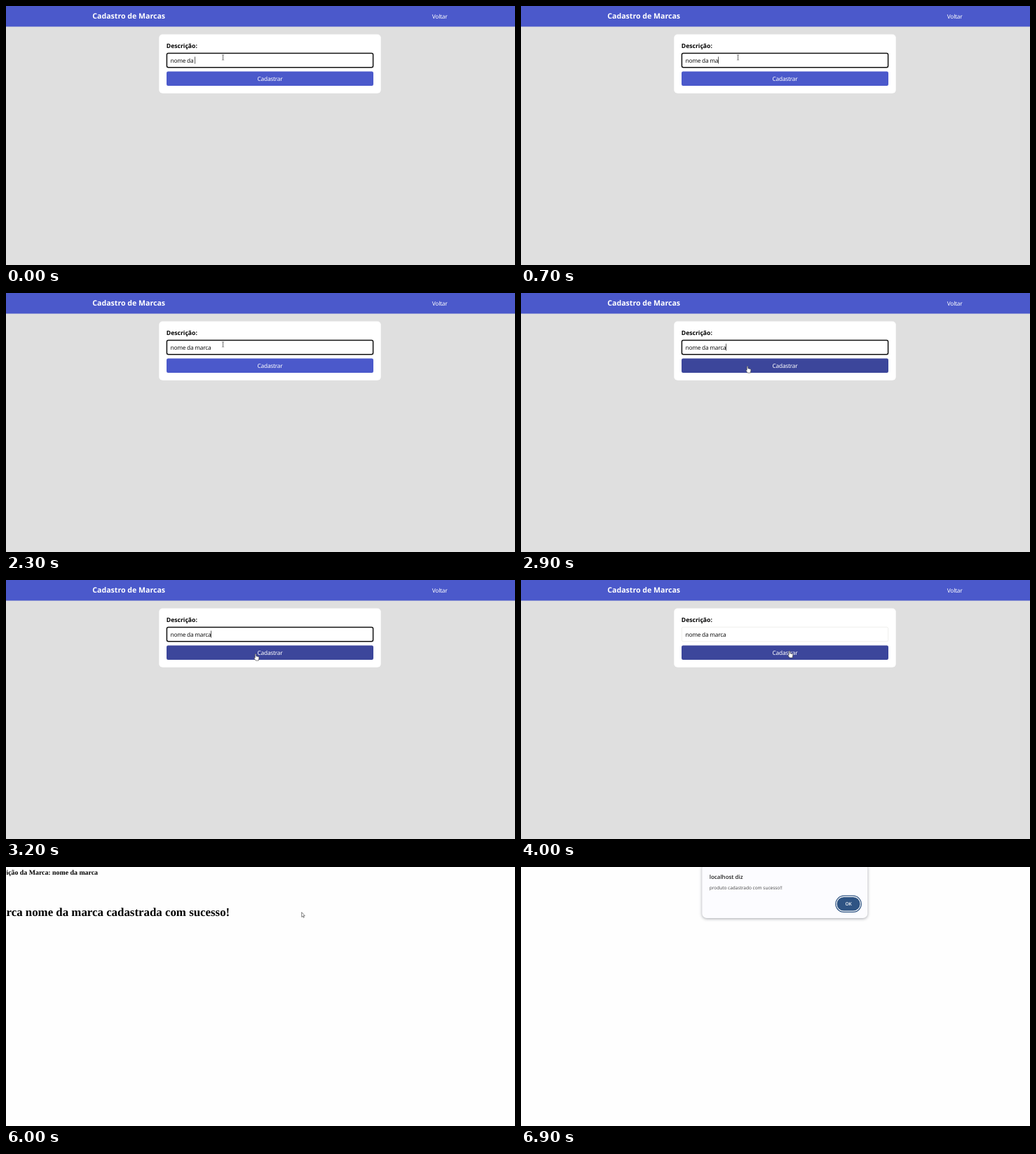
Animation, 726 px wide and 370 px high, one loop 8 s. Source, as an HTML page with a canvas:

```html
<!DOCTYPE html>
<html lang="pt">
<head>
<meta charset="utf-8">
<title>Cadastro de Marcas</title>
<style>
html, body { margin: 0; width: 100%; height: 100%; overflow: hidden; background: #fefefe; }
canvas { display: block; }
</style>
</head>
<body>
<canvas id="stage" width="726" height="370"></canvas>
<script>
const ctx = document.getElementById('stage').getContext('2d');
const LOOP = 8000;
const UI = '"Noto Sans", "Open Sans", sans-serif';
const SERIF = '"Liberation Serif", "Times New Roman", serif';
const DIALOG = '"Open Sans", "Noto Sans", sans-serif';
const BLUE = '#4b59cb', HOVER = '#3c469b';

// [time, characters shown]
const typing = [[0, 8], [500, 9], [700, 10], [1000, 11], [1400, 12], [1800, 13]];
// [time, caret visible]
const caretOn = [[0, 1], [300, 0], [500, 1], [2300, 0], [2800, 1], [3300, 0]];
// [time, x, y] of the pointer's hot spot
const path = [
  [0, 309.5, 73.5], [2700, 309.5, 73.5], [2800, 313, 84], [2900, 323, 104.5],
  [3100, 343, 107], [3300, 369, 104], [3500, 382.7, 101.5],
  [5900, 383.7, 101.5], [6000, 421.7, 64.7], [6100, 445, 36], [6200, 457, 16.5]
];

const at = (list, t) => list.filter(e => e[0] <= t).pop()[1];

function pointer(t) {
  t = Math.floor(t / 100) * 100;
  const i = path.findIndex(p => p[0] > t);
  if (i < 0) return path[path.length - 1].slice(1);
  const a = path[i - 1], b = path[i];
  const k = (t - a[0]) / (b[0] - a[0]);
  return [a[1] + (b[1] - a[1]) * k, a[2] + (b[2] - a[2]) * k];
}

function text(str, x, y, font, color, align = 'left', spacing = 0) {
  ctx.font = font;
  ctx.fillStyle = color;
  ctx.textAlign = align;
  ctx.textRendering = 'geometricPrecision';
  ctx.letterSpacing = spacing + 'px';
  ctx.fillText(str, x, y);
}

function box(x, y, w, h, r, fill, stroke, line = 1) {
  ctx.beginPath();
  ctx.roundRect(x, y, w, h, r);
  if (fill) { ctx.fillStyle = fill; ctx.fill(); }
  if (stroke) { ctx.strokeStyle = stroke; ctx.lineWidth = line; ctx.stroke(); }
}

function shape(x, y, d, line) {
  const p = new Path2D(d);
  ctx.save();
  ctx.translate(x, y);
  ctx.lineJoin = 'round';
  ctx.lineWidth = line;
  ctx.strokeStyle = '#333';
  ctx.fillStyle = '#fff';
  ctx.fill(p);
  ctx.stroke(p);
  ctx.restore();
}

const beam = (x, y) =>
  shape(x, y, 'M-1.5 -3.5H-.4M.4 -3.5H1.5M0 -3.2V3.2M-1.5 3.5H-.4M.4 3.5H1.5', 0.7);
const arrow = (x, y) =>
  shape(x, y, 'M0 0V6.8L1.6 5.4L2.6 7.7L3.6 7.2L2.6 5H4.6Z', 0.6);
const hand = (x, y) =>
  shape(x, y, 'M-.8 .6Q0 -.5 .8 .6V3.3L4 4Q5 4.3 5 5.4L4.3 9.6H.2L-2.2 6.3Q-2.4 5 -.8 5.8Z', 0.6);

function formPage(t) {
  const hover = t >= 2900, regular = '8.3px ' + UI;
  ctx.fillStyle = '#dfdfdf';
  ctx.fillRect(0, 0, 726, 370);
  ctx.fillStyle = BLUE;
  ctx.fillRect(0, 0, 726, 29.5);
  text('Cadastro de Marcas', 123.3, 18, 'bold 10.6px ' + UI, '#fff');
  text('Voltar', 607.8, 17.5, regular, '#fff', 'left', -0.24);

  box(218.3, 40.5, 316.4, 84.3, 5, '#fff');
  text('Descrição:', 228.8, 59.6, 'bold 8.6px ' + UI, '#000');

  if (t < 3900) box(229.4, 67.4, 294.2, 20.4, 2.2, '#fff', '#111', 1.5);
  else box(229.3, 67.3, 294.4, 20.6, 2.2, '#fff', t < 4000 ? '#d0d0d0' : '#eeeeea', 0.9);

  const value = 'nome da marca'.slice(0, at(typing, t));
  text(value, 234.5, 80.6, regular, '#111', 'left', -0.24);
  if (at(caretOn, t)) {
    ctx.fillStyle = '#333';
    ctx.fillRect(Math.round(234.5 + ctx.measureText(value).width), 72.5, 0.8, 10);
  }

  box(229, 93.5, 295, 20.5, 2.2, hover ? HOVER : BLUE);
  text('Cadastrar', 376.5, 107.3, regular, '#fff', 'center', -0.24);
  (hover ? hand : beam)(...pointer(t));
}

function resultPage(t) {
  text('Descrição da Marca: nome da marca', 131, 11.4, 'bold 9.86px ' + SERIF, '#000', 'right');
  text('Marca nome da marca cadastrada com sucesso!', 319.2, 70.2, 'bold 16.86px ' + SERIF, '#000', 'right');
  arrow(...pointer(t));
}

function alertPage() {
  ctx.save();
  ctx.shadowColor = 'rgba(40,45,60,.42)';
  ctx.shadowBlur = 4;
  ctx.shadowOffsetY = 1;
  box(258.3, -4, 236, 77, 6.5, '#fcfcff');
  ctx.restore();
  text('localhost diz', 268.8, 16.7, '600 7.95px ' + DIALOG, '#222');
  text('produto cadastrado com sucesso!!', 268.8, 31.8, '6.5px ' + DIALOG, '#444');
  box(448.9, 41.2, 36.4, 23.2, 11.6, '#fff', '#2f5484', 1.3);
  box(450.6, 43, 33, 19.6, 9.8, '#2f5484');
  text('OK', 467.1, 55.3, '600 6.6px ' + DIALOG, '#fff', 'center');
}

function draw(now) {
  const t = now % LOOP;
  ctx.fillStyle = '#fefefe';
  ctx.fillRect(0, 0, 726, 370);
  if (t < 4300) formPage(t);
  else if (t < 6900) resultPage(t);
  else alertPage();
}

let start;
function frame(now) {
  start ??= now;
  draw(Math.max(0, now - start));
  requestAnimationFrame(frame);
}
draw(0);
requestAnimationFrame(frame);
</script>
</body>
</html>
```
